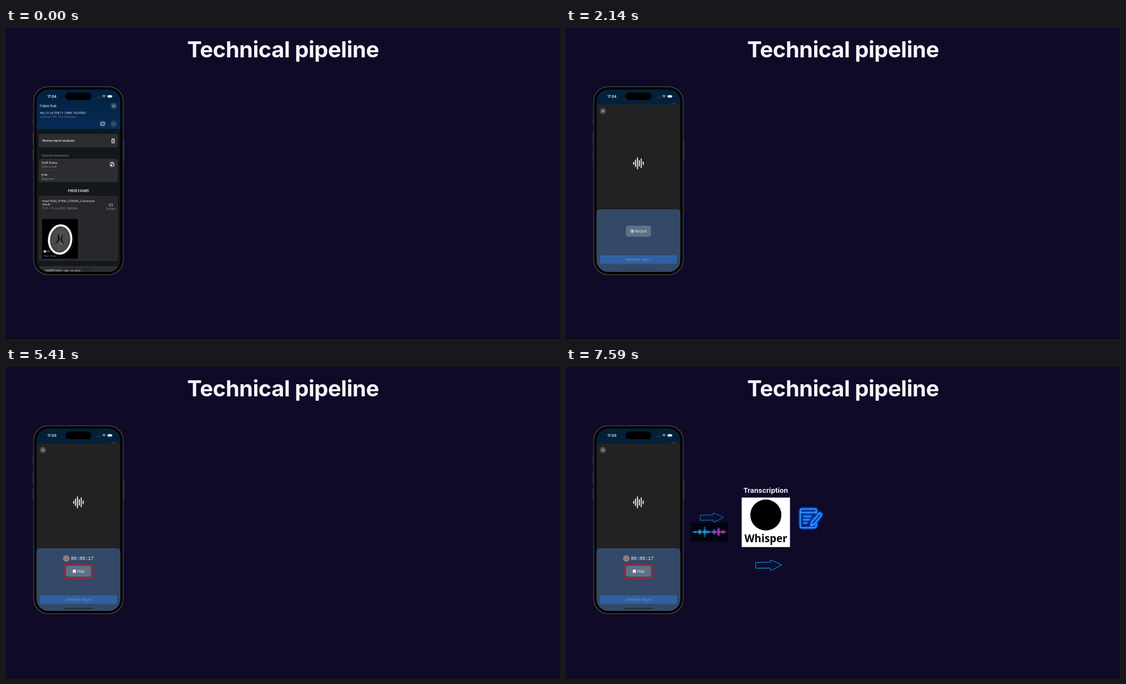
An HTML page for the animation above (8 s loop, 998x561 px).

```html
<!DOCTYPE html>
<html lang="en">
<head>
<meta charset="utf-8">
<title>Technical pipeline</title>
<style>
  html, body { margin: 0; width: 100%; height: 100%; overflow: hidden; background: #0f0a28; }
  svg { display: block; width: 100%; height: 100%; font-family: Inter, sans-serif; font-size: 5.4px; fill: #eceef0; }
  .small { font-size: 4.75px; }
  .dim { fill: #94969b; }
  .strong { font-weight: 600; }
  .mid { text-anchor: middle; }
  .line { fill: none; stroke: #e8eaee; stroke-width: .9; stroke-linecap: round; stroke-linejoin: round; }
  .card { fill: #2c2d30; }
  .mark { fill: none; stroke: #e0101c; stroke-width: 1.4; }
</style>
</head>
<body>
<svg viewBox="0 0 998 561">
  <defs>
    <clipPath id="screen"><rect x="55" y="111" width="151" height="329" rx="21"/></clipPath>
    <linearGradient id="header" x2="0" y2="1">
      <stop stop-color="#03203f"/><stop offset="1" stop-color="#062b57"/>
    </linearGradient>
    <linearGradient id="sound" gradientUnits="userSpaceOnUse" x1="228" x2="288">
      <stop stop-color="#22c8ee"/><stop offset=".45" stop-color="#25a9f5"/>
      <stop offset=".68" stop-color="#7a6cf2"/><stop offset=".8" stop-color="#d544e0"/><stop offset="1" stop-color="#e03cc0"/>
    </linearGradient>
    <radialGradient id="neonBack">
      <stop stop-color="#07308c"/><stop offset=".6" stop-color="#051a58"/><stop offset="1" stop-color="#060a30"/>
    </radialGradient>
    <filter id="glow" x="-30%" y="-30%" width="160%" height="160%"><feGaussianBlur stdDeviation="1.6"/></filter>
    <path id="arrow" d="M241.8 267.2 L265 266.8 L265.6 263.2 Q275 266.5 283.6 271.3 Q275 276.5 266 280 L265 276.2 L242 276.4 Z"
      fill="#08102f" stroke="#1b86c4" stroke-linejoin="round"/>
    <g id="neon" fill="none" stroke-linecap="round" stroke-linejoin="round">
      <path d="M451 263 V258 Q451 256 449 256 H425 Q422 256 422 259 V287 Q422 290 425 290 H446 Q451 290 451 286 V282"/>
      <path d="M422 262.500 H450 M428 269.500 H441 M428 275.500 H438 M428 281.500 H434"/>
      <path d="M457 263 Q461 264 460 268 L447 284 L441 286 L442.500 280 Z"/>
    </g>
  </defs>

  <rect width="998" height="561" fill="#0f0a28"/>
  <rect y="560" width="998" height="1" fill="#04020c"/>
  <text class="mid" x="499" y="53" font-size="40" font-weight="700" letter-spacing="-.5" fill="#f5f3f7">Technical pipeline</text>

  <!-- phone body -->
  <path d="M49 163 V174 M49 188 V211 M49 218 V241 M212.300 203 V240" stroke="#33333a" stroke-width="1.600"/>
  <rect x="49.700" y="105.700" width="161.600" height="339.600" rx="27" fill="#000" stroke="#414142" stroke-width="1.500"/>
  <rect x="51" y="107" width="159" height="337" rx="25.500" fill="none" stroke="#161618"/>

  <g clip-path="url(#screen)">
    <!-- patient screen -->
    <g data-show="0 2140">
      <rect x="55" y="111" width="151" height="330" fill="#12181b"/>
      <rect x="55" y="111" width="151" height="71" fill="url(#header)"/>
      <text x="61" y="142.700" font-size="5.900">Fidela Ruik</text>
      <text class="small" x="61" y="154.800">46y | 8 Jul 1978 | F | MRN: 76201983</text>
      <text class="small" x="61" y="161.800" fill="#5f7f9f">Unknown QEL Test Institution</text>
      <g fill="#26415f">
        <circle cx="194" cy="140.500" r="6"/><circle cx="174.300" cy="173" r="6"/><circle cx="194" cy="173" r="6"/>
      </g>
      <path class="line" d="M192 138.500 l4 4 m0 -4 l-4 4 M171.300 170.300 h6 v4.500 h-3.500 l-1.500 1.500 v-1.500 h-1 z"/>
      <path class="line" d="M191.500 173 h0 m2.500 0 h0 m2.500 0 h0" stroke-width="1.200"/>

      <rect class="card" x="59" y="191" width="142.500" height="24.500" rx="3"/>
      <text class="strong" x="65.500" y="205.400" font-size="5.300">Review report analysis</text>
      <path class="line" d="M191.500 200.500 h-1 v7 h5 v-7 h-1 m-3 -.7 h3 v1.400 h-3 z m.3 3.800 h2.400 m-2.400 2 h2.400" stroke-width=".7"/>

      <text class="dim" x="64" y="231.700">Clinical Information</text>
      <rect class="card" x="59" y="236" width="142.500" height="42" rx="3"/>
      <path d="M64 256.500 H201" stroke="#404146" stroke-width=".6"/>
      <text x="64" y="244.600">Staff Notes</text>
      <text class="small dim" x="64" y="252">Click to add</text>
      <text x="64" y="266.600">EHR</text>
      <text class="small dim" x="64" y="273.800">Diagnoses</text>
      <circle cx="191" cy="246" r="6" fill="#484a4f"/>
      <path class="line" d="M189 245 v-2.500 h3 l2 2 v4.500 h-2 M192 242.500 v2 h2"/>
      <circle cx="189.500" cy="247.800" r="1.700"/>

      <text class="strong mid" x="130.500" y="295.800" font-size="5.500">PRIOR EXAMS</text>
      <rect x="59" y="303" width="142.500" height="117" rx="3" fill="#28282c"/>
      <rect x="59.300" y="303.300" width="142" height="116.400" rx="3" fill="none" stroke="#34353a" stroke-width=".6"/>
      <text class="small" x="65" y="314.300">Head HEAD_SPIRAL_STROKE_Customized</text>
      <text class="small" x="65" y="320">(Adult)</text>
      <text class="small dim" x="65" y="327">13:12 • 12 Jun ACC: 6bfc8de</text>
      <text class="mid" x="188.600" y="322.300" font-size="6.600">1/1</text>
      <text class="small dim mid" x="188.600" y="328.300">Studies</text>

      <rect x="65" y="344.500" width="64.500" height="71.500" rx="1" fill="#000"/>
      <path d="M122 377 Q124 402 103 410" fill="none" stroke="#3a3a3a" stroke-width=".6"/>
      <g transform="rotate(7 97.500 381.500)">
        <ellipse cx="97.500" cy="381.500" rx="22.500" ry="28" fill="#2f2f2f"/>
        <ellipse cx="97.500" cy="381.500" rx="20" ry="25.500" fill="#4b4b4b" stroke="#fff" stroke-width="3.600"/>
        <ellipse cx="97.500" cy="381.500" rx="16.500" ry="22" fill="none" stroke="#363636" stroke-width="2" stroke-dasharray="2 3"/>
        <path d="M97.500 360 V404" stroke="#626262" stroke-width=".7"/>
        <path d="M92 371 Q96 375 97 381 Q95 388 88 391 Q94 385 93 379 Z M102 371 Q98 376 98 381 Q100 387 106 389 Q101 384 101 378 Z" fill="#151515"/>
        <circle cx="101" cy="389" r=".8"/>
      </g>
      <circle class="line" cx="70" cy="403" r="2.200" stroke-width=".7"/>
      <path class="line" d="M68.500 402.500 h3 m-3 1.300 h3" stroke-width=".6"/>
      <text x="74" y="404.800" font-size="4.700" fill="#c4d4e4">41</text>
      <text x="67.500" y="412.600" font-size="4.200" fill="#4289c4">Brain Stroke</text>

      <rect class="card" x="59" y="429.500" width="142.500" height="20" rx="3"/>
      <text class="small" x="66" y="439.400">... test001 echo - last 1 m, proc</text>
      <rect x="104" y="434.700" width="53" height="1.600" rx=".8" fill="#1b1b1e"/>
    </g>

    <!-- recording sheet -->
    <g data-show="2140 8000">
      <rect x="55" y="111" width="151" height="330" fill="#04203a"/>
      <circle cx="194" cy="140.500" r="6" fill="#1c3042"/>
      <rect x="55" y="138" width="151" height="220" rx="4" fill="#222"/>
      <circle cx="66.500" cy="149.800" r="5.800" fill="#4a4a4b"/>
      <path class="line" d="M64.500 147.800 l4 4 m0 -4 l-4 4" stroke="#aaa"/>
      <path class="line" d="M122 242 v4 M125.300 238 v12 M128.700 234 v20 M132.100 239 v10 M135.500 236 v16 M139.100 241.500 v5" style="stroke:#fff;stroke-width:1.7"/>
      <rect x="55" y="327" width="151" height="125" rx="6" fill="#334967"/>
      <g id="generate">
        <rect x="61" y="410" width="139" height="15.200" rx="2.500" fill="#2f61a2"/>
        <text class="mid" x="130.500" y="420" font-size="6.200" fill="#7496c4">Generate report</text>
      </g>
    </g>
    <g data-show="2140 4320">
      <rect x="108" y="356.500" width="45" height="20" rx="4" fill="#607187"/>
      <circle class="line" cx="119.300" cy="366.500" r="3"/>
      <circle cx="119.300" cy="366.500" r="1.400"/>
      <text x="124.500" y="368.700" font-size="6.100">Record</text>
      <rect x="104" y="434.900" width="53" height="1.600" rx=".8" fill="#293c56"/>
    </g>
    <g data-show="4320 8000">
      <circle cx="108.500" cy="345.400" r="5.800" fill="#7b8797"/>
      <circle cx="108.500" cy="345.400" r="3.200" fill="#b8675f"/>
      <text x="117" y="348.300" font-size="8.500" font-family="Liberation Mono, monospace" fill="#fff">00:00:17</text>
      <rect x="108" y="358.700" width="45" height="19.600" rx="4" fill="#607187"/>
      <rect x="120.300" y="365.600" width="5.600" height="5.600" rx=".6"/>
      <text x="128" y="370.800" font-size="6.200">Stop</text>
      <rect x="104" y="434.700" width="53" height="1.800" rx=".9" fill="#1c2430"/>
    </g>

    <!-- status bar -->
    <rect x="107" y="116.500" width="47" height="13.500" rx="6.750" fill="#000"/>
    <g class="strong" font-size="6.300">
      <text x="74.500" y="125.600" data-show="0 4320">17:04</text>
      <text x="74.500" y="125.600" data-show="4320 8000">17:09</text>
    </g>
    <path d="M164 125 h6" stroke="#69798b" stroke-width=".9" stroke-dasharray="1 .7"/>
    <path class="line" d="M173.700 122.300 q2.800 -2.200 5.600 0 M175 123.800 q1.500 -1.200 3 0 M176.500 125 h0" stroke-width="1.100"/>
    <rect x="183" y="121.200" width="7.800" height="4.200" rx="1.300" fill="#fff"/>
    <rect x="191.200" y="122.600" width=".7" height="1.400"/>
  </g>

  <rect class="mark" data-show="1050 2140" x="59.300" y="191.300" width="142.400" height="23.900" rx="3.500"/>
  <rect class="mark" data-show="3230 4320" x="106" y="354" width="49" height="23.600" rx="3"/>
  <rect class="mark" data-show="5410 8000" x="106" y="357" width="49" height="24" rx="3"/>

  <g data-show="6500 8000">
    <use href="#arrow"/>
    <rect x="225.500" y="281" width="66.700" height="33.300" fill="#02030f"/>
    <path class="wave" stroke="url(#sound)" stroke-width="2" opacity=".45" filter="url(#glow)"/>
    <path class="wave" stroke="url(#sound)" stroke-width=".8"/>
  </g>

  <g data-show="7590 8000">
    <text class="mid" x="359.700" y="227" font-size="12.300" font-weight="700" fill="#f5f3f7">Transcription</text>
    <rect x="316.500" y="235.500" width="87" height="89.300" fill="#fff"/>
    <circle cx="360" cy="267" r="28" fill="#000"/>
    <text class="mid" x="360" y="316.400" font-size="18.800" font-weight="700" font-family="Noto Sans, sans-serif" fill="#000">Whisper</text>
    <use href="#arrow" transform="translate(341.500 357.500) scale(1.120) translate(-241.800 -271.600)"/>
    <rect x="417.500" y="249.500" width="44.500" height="45.500" fill="url(#neonBack)"/>
    <use href="#neon" stroke="#1268ff" stroke-width="4" filter="url(#glow)"/>
    <use href="#neon" stroke="#3aa4ff" stroke-width="1.400"/>
  </g>
</svg>
<script>
  const LOOP = 8000;
  const timed = [...document.querySelectorAll('[data-show]')].map(el => {
    const [from, to] = el.dataset.show.split(' ').map(Number);
    return { el, from, to };
  });
  const generate = document.getElementById('generate');

  // Peaks of the sound wave: centre, height, spread
  const peaks = [[233, 1.5, 2], [241, 4.5, 2.5], [250, 9, 1.8], [256, 2.5, 2], [267, 4.5, 2.5], [275, 9, 1.8], [283, 3, 3]];
  let wave = 'M228 297.5 H288';
  for (let x = 228; x <= 288; x++) {
    const swell = peaks.reduce((sum, [c, h, s]) => sum + h * Math.exp(-(((x - c) / s) ** 2)), .3);
    const height = swell * (.72 + .28 * Math.cos(x * Math.PI));
    wave += `M${x} ${297.5 - height}v${2 * height}`;
  }
  document.querySelectorAll('.wave').forEach(path => path.setAttribute('d', wave));

  const start = performance.now();
  function draw() {
    const t = (performance.now() - start) % LOOP;
    for (const { el, from, to } of timed) el.style.display = t >= from && t < to ? '' : 'none';
    generate.setAttribute('transform', `translate(0 ${t < 4320 ? 0 : 2})`);
    requestAnimationFrame(draw);
  }
  draw();
</script>
</body>
</html>
```
